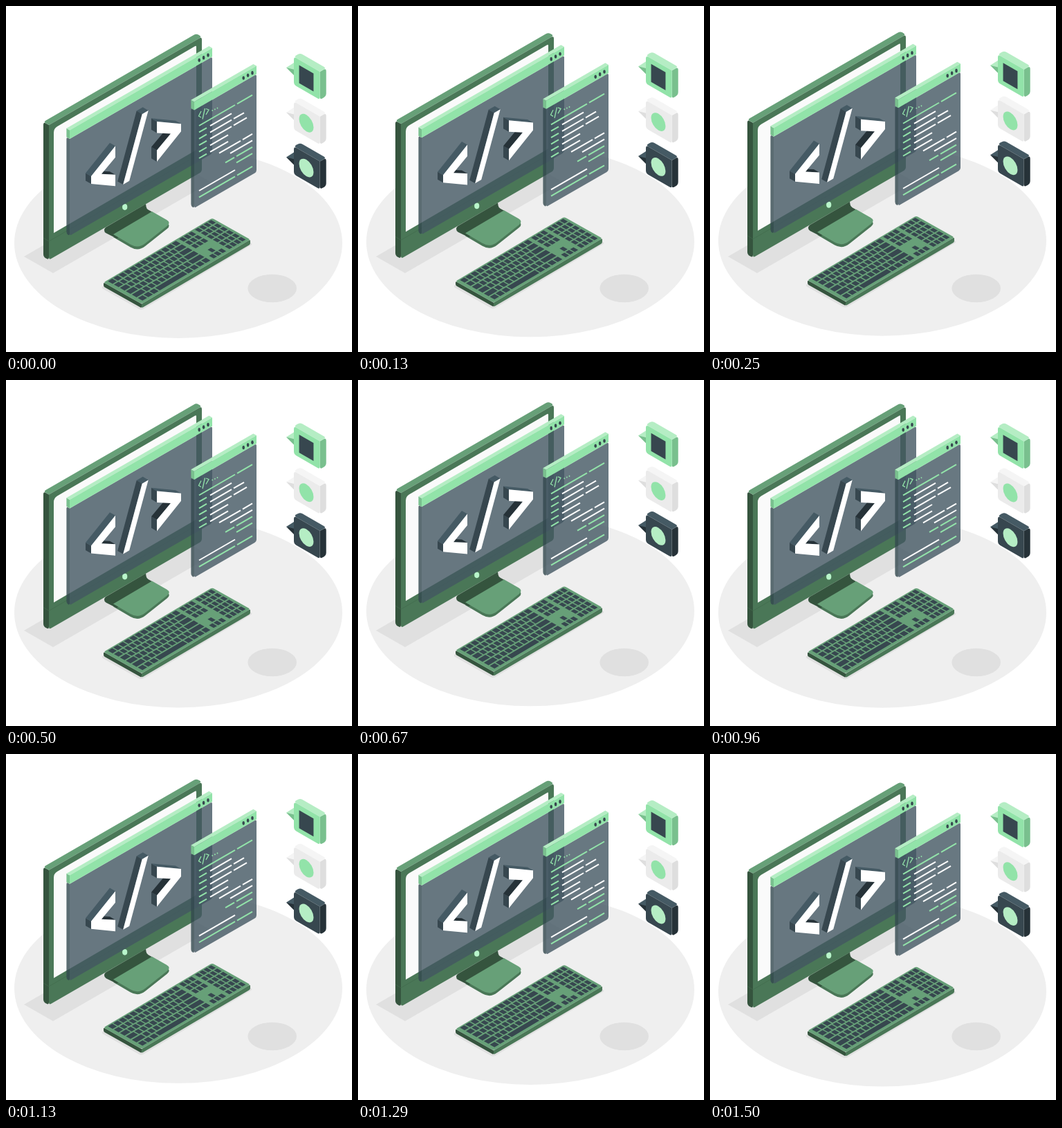
Recreate the animation shown at these times as an HTML page. Size 500 by 500 pixels, loop 1.54 s.

```html
<!DOCTYPE html>
<html lang="en">
<head>
<meta charset="utf-8">
<title>Isometric coding desk</title>
<style>
html, body { margin: 0; width: 100%; height: 100%; overflow: hidden; background: #fff; }
svg { display: block; width: 100vw; height: 100vh; }
</style>
</head>
<body>
<svg viewBox="0 0 500 500">
  <g id="floor"><ellipse cx="249" cy="342.5" rx="237" ry="137.5" fill="#efefef"/></g>
  <path d="M26 362L68 386L296 254.500L254 230.500Z" fill="#e0e0e0"/>
  <ellipse cx="384.700" cy="408" rx="35.300" ry="20.300" fill="#e0e0e0"/>
  <g id="scene"></g>
</svg>
<script>
const SLOPE = 0.577;
const GREEN = { top: '#67a078', front: '#4a7757', side: '#35543e' };
const SLATE = { top: '#455a64', front: '#37474f', side: '#263238' };
const MINT = { top: '#b5edc4', front: '#92e3a9', side: '#79c08e' };
const PALE = { top: '#f5f5f5', front: '#ebebeb', side: '#dedede' };
const GLASS = { top: 'none', front: '#435762', side: '#33484f' };
const scene = document.getElementById('scene');
const floor = document.getElementById('floor');
const out = [];

// Filled polygon of [x, y, r] points; r rounds that corner.
function poly(pts, fill) {
  const toward = (a, b) => {
    const k = Math.min(a[2] / Math.hypot(b[0] - a[0], b[1] - a[1]), 0.5);
    return [0, 1].map(i => (a[i] + (b[i] - a[i]) * k).toFixed(2)).join(' ');
  };
  const d = pts.map((p, i) => {
    const cmd = i ? 'L' : 'M';
    if (!p[2]) return cmd + p[0] + ' ' + p[1];
    const prev = pts.at(i - 1), next = pts[(i + 1) % pts.length];
    return `${cmd}${toward(p, prev)}Q${p[0]} ${p[1]} ${toward(p, next)}`;
  }).join('');
  out.push(`<path d="${d}Z" fill="${fill}"/>`);
}

function oval(x, y, rx, ry, fill) {
  out.push(`<ellipse cx="${x}" cy="${y}" rx="${rx}" ry="${ry}" fill="${fill}"/>`);
}

function line(d, color, width) {
  out.push(`<path d="${d}" fill="none" stroke="${color}" stroke-width="${width}"/>`);
}

function group(attrs, paint) {
  out.push(`<g ${attrs}>`);
  paint();
  out.push('</g>');
}

// Upright box seen from its near edge at x, y; dir is the way its front runs.
function box(x, y, w, h, depth, tone, r = 0, dir = 1) {
  const at = (a, b, z, r) => [x + dir * (a - z), y + b - (a + z) * SLOPE, r];
  poly([at(0, 0, depth, r), at(0, 0, 0), at(0, h, 0, r), at(0, h, depth, r)], tone.side);
  poly([at(0, 0, depth, r), at(w, 0, depth, r), at(w, 0, 0, r), at(0, 0, 0)], tone.top);
  poly([at(0, 0, 0), at(w, 0, 0, r), at(w, h, 0, r), at(0, h, 0, r)], tone.front);
}

function stand() {
  const foot = dy => [[155, 330 + dy], [211, 297 + dy], [239, 313 + dy, 8], [191, 351 + dy, 13]];
  poly(foot(4), GREEN.front);
  poly([[142, 321, 4], [202, 286], [203, 293, 3], [212, 298], [160, 336], [142, 327, 3]], GREEN.side);
  poly(foot(0), GREEN.top);
}

function monitor() {
  box(62, 172, 221, 195, 8, GREEN, 4);
  poly([[69, 177, 6], [275, 57, 2], [275, 208], [69, 328]], '#fafafa');
  line('M54 335L62 340L283 212', '#416b4d', 0.7);
  oval(171.7, 290.5, 3.6, 4.4, '#b9f5cb');
}

function pane(x, y, w, bar, h) {
  group('opacity=".8"', () => box(x, y + bar, w, h, 4.6, GLASS, 3));
  box(x, y, w, bar, 4.6, MINT);
  for (let i = 0; i < 3; i++) {
    const a = w - 18.8 + i * 6.4;
    oval(x + a, y + bar / 2 + 0.6 - a * SLOPE, 1.8, 2.8, SLATE.front);
  }
}

// Clockwise outline on the wall around cx, cy, pushed back into the wall.
function glyph(cx, cy, outline) {
  const dx = -8, dy = -4.6;
  const pts = outline.map(([a, b]) => [cx + a, cy + b - a * SLOPE]);
  pts.forEach((p, i) => {
    const j = (i + 1) % pts.length, q = pts[j];
    const ex = q[0] - p[0], ey = q[1] - p[1];
    if (ey * dx - ex * dy <= 0) return;
    const steep = Math.abs(ey) > 2 * Math.abs(ex);
    const low = outline[i][1] + outline[j][1] > 0;
    const fill = steep ? SLATE.front : low ? SLATE.side : SLATE.top;
    poly([p, q, [q[0] + dx, q[1] + dy], [p[0] + dx, p[1] + dy]], fill);
  });
  poly(pts, '#fff');
}

function bigTag() {
  const upper = [[15, 0], [35, -12.5], [35, -29], [0, -5.5]];
  const lower = upper.slice(1).reverse().map(([a, b]) => [a, -b]);
  const left = [...upper, ...lower].reverse();
  const clockwise = [...left].reverse();
  const right = left.map(([a, b]) => [36 - a, b]);
  const slash = [[9.3, -43], [18.3, -43], [-9.2, 43], [-18.2, 43]];
  glyph(123, 251.5, area(left) > 0 ? left : clockwise);
  glyph(187.4, 204.5, slash);
  glyph(217, 196.5, area(right) > 0 ? right : [...right].reverse());
}

function area(pts) {
  return pts.reduce((sum, p, i) => {
    const q = pts[(i + 1) % pts.length];
    return sum + p[0] * q[1] - q[0] * p[1];
  }, 0);
}

function codeLines() {
  const LEFT = 279, RIGHT = 356, STEP = 9.4;
  const dash = (row, a, b, color) => {
    const y = x => 173 + row * STEP - (x - LEFT) * SLOPE;
    line(`M${a} ${y(a)}L${b} ${y(b)}`, color, 2);
  };
  for (const row of [0, 11]) {
    dash(row, LEFT, 331, MINT.front);
    dash(row, 334, RIGHT, MINT.front);
  }
  dash(10, LEFT, 331, '#fff');
  [327, 344, 348, 321, 321].forEach((end, i) => {
    dash(i + 1, LEFT, 290, MINT.front);
    dash(i + 1, 295, Math.min(end, 326), '#fff');
    if (end > 330) dash(i + 1, 329, end, '#fff');
  });
  [308, 324, 317, 333].forEach((start, i) => {
    const color = i < 2 ? '#fff' : MINT.front;
    const split = [339, 0, 330, 0][i];
    if (split) dash(i + 6, start, split, color);
    dash(i + 6, split ? split + 3 : start, RIGHT, color);
  });
  line('M282 152L278.500 159L282 161M287.500 148L284 163.500M289 148.500L293 150L289 157', MINT.front, 1.3);
  for (let i = 0; i < 3; i++) oval(298.3 + i * 3.6, 151 - i * 1.7, 0.9, 1.1, MINT.front);
}

// Point on the keyboard plate, u along and v across, both 0..1.
const plate = (u, v, drop = 0, r = 0) =>
  [141 + 157 * u + 55 * v, 399.5 - 93 * u + 31 * v + drop, r];

// One row of keys; the first and last may be wider, as may one in the middle.
function keyRow(row, start, end, count, first = 1, last = 1, middle = 1) {
  const v = 0.03 + row * 0.157;
  const size = i => i === 0 ? first : i === count - 1 ? last : i === 3 ? middle : 1;
  const unit = (end - start) / (count - 3 + first + last + middle);
  for (let i = 0, u = start; i < count; i++) {
    const a = u + 0.005, b = u + unit * size(i) - 0.005, c = v + 0.122;
    poly([plate(a, v), plate(b, v), plate(b, c), plate(a, c)], SLATE.front);
    u += unit * size(i);
  }
}

function keyboard() {
  const sheet = (pad, drop, r) => [[0, 0], [1, 0], [1, 1], [0, 1]].map(([u, v]) =>
    plate(u + pad * (u - 0.5), v + pad * (v - 0.5) * 2, drop, r));
  poly(sheet(0.03, 7, 4), '#e0e0e0');
  poly([plate(0, 0, 0, 2), plate(0, 1), plate(0, 1, 6, 2), plate(0, 0, 6, 2)], GREEN.side);
  poly([plate(0, 1), plate(1, 1, 0, 2), plate(1, 1, 7, 2), plate(0, 1, 6, 2)], GREEN.front);
  poly(sheet(0, 0, 3), GREEN.top);
  for (let row = 0; row < 6; row++) {
    if (row < 5) keyRow(row, 0.025, 0.66, row ? 15 - row : 13, 1 + row * 0.25, row ? 1.7 + row * 0.2 : 1);
    else keyRow(row, 0.025, 0.66, 8, 1, 1, 5);
    if (row < 3 || row === 5) keyRow(row, 0.68, 0.805, 3);
    if (row === 4) keyRow(row, 0.722, 0.763, 1);
    keyRow(row, 0.825, 0.985, 4);
  }
}

function badge(index, tone, mark) {
  group(`transform="translate(0 ${index * 64.8})"`, () => {
    poly([[405, 89], [416, 82], [420, 90], [417, 94]], tone.top);
    poly([[405, 89], [417, 92], [417, 101]], tone.side);
    box(453.7, 95, 37.7, 40.5, 9, tone, 4, -1);
    group('transform="matrix(.87 .5 0 1 434 104.5)"', () => out.push(mark));
  });
}

stand();
monitor();
pane(92, 179.5, 206, 12.5, 140);
bigTag();
pane(272, 138.5, 90, 12, 141.5);
codeLines();
keyboard();
badge(0, MINT, `<rect x="-12" y="-13" width="24" height="26" fill="${SLATE.front}"/>`);
badge(1, PALE, `<circle r="12" fill="${MINT.front}"/>`);
badge(2, SLATE, `<circle r="12" fill="${MINT.top}"/>`);
scene.innerHTML = out.join('');

// Steady rise and fall; the lowest point falls 45 ms before the loop ends.
const LOOP = 1540, LEAD = 45, HEIGHT = 10;
const lift = t => HEIGHT * (1 - Math.abs(1 - ((t + LEAD) % LOOP) / (LOOP / 2)));

function draw(t) {
  const move = `translate(0 ${(lift(0) - lift(t)).toFixed(3)})`;
  scene.setAttribute('transform', move);
  floor.setAttribute('transform', move);
}

let began = null;
function tick(now) {
  if (began === null) began = now;
  draw((now - began) % LOOP);
  requestAnimationFrame(tick);
}
draw(0);
requestAnimationFrame(tick);
</script>
</body>
</html>
```
